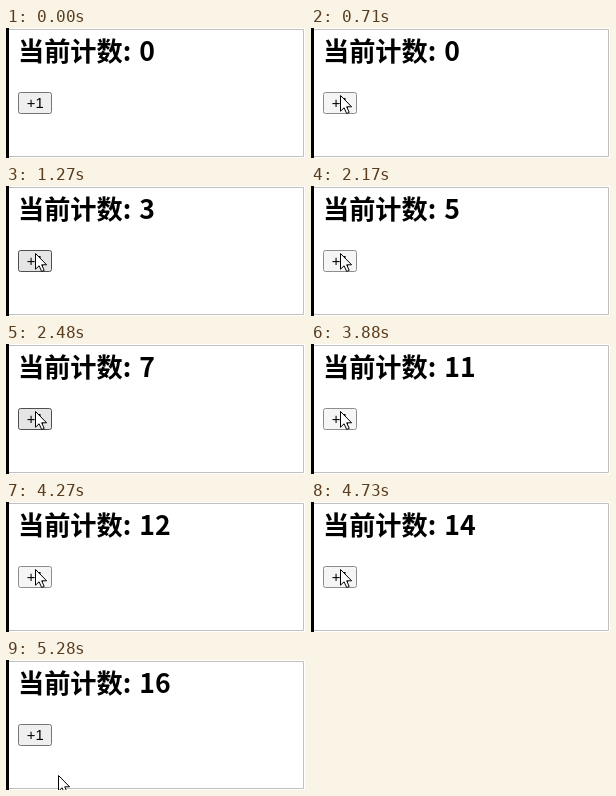
Recreate the animation shown at these times as an HTML page. Size 299 px wide and 130 px high, loop 5920 ms.

```html
<!DOCTYPE html>
<html lang="zh-CN">
<head>
<meta charset="utf-8">
<title>计数器</title>
<style>
  html, body { margin: 0; width: 100%; height: 100%; overflow: hidden; background: #fff; }
  svg { display: block; width: 299px; height: 130px; }
  .heading { font: bold 26.2px "Noto Sans CJK SC", "Noto Sans CJK", "Noto Sans", sans-serif; }
  #count { font-size: 26.6px; }
  .label { font: 14.8px "Liberation Sans", Arial, sans-serif; }
</style>
</head>
<body>
<svg viewBox="0 0 299 130">
  <path d="M3 1.5H297.5V128.5H3" fill="none" stroke="#c0c0c0"/>
  <rect width="3" height="130"/>
  <g class="heading">
    <text x="12" y="32.5">当前计数:</text>
    <text id="count" x="133.2" y="32.5">0</text>
  </g>
  <rect id="button" x="12.5" y="64.5" width="33" height="21" rx="2"/>
  <text class="label" x="29.3" y="80" text-anchor="middle">+1</text>
  <path id="cursor" d="M.5 .5V16.2L4.1 12.8L6.7 18.5L9.2 17.4L6.7 11.8H11.6Z" fill="#fff" stroke="#000"/>
</svg>
<script>
const LOOP = 5920, STEP = 80, ENTER = 70, ENTER_STEPS = 5, PRESS = 115;
const [count, button, cursor] = ['count', 'button', 'cursor'].map(id => document.getElementById(id));

// Two clicks per beat; the cursor leaves on the last beat.
const beats = [780, 1270, 1980, 2480, 3030, 3500, 4280, 4810, 5130];
const leave = beats.at(-1);
const clicks = beats.slice(0, -1).flatMap((beat, i) => [beat, beat + 0.6 * (beats[i + 1] - beat)]);

const looks = {
  normal: ['#efefef', '#767676'],
  hover: ['#e5e5e5', '#4f4f4f'],
  active: ['#f5f5f5', '#8d8d8d']
};

// Rises past the button and settles back, then speeds off to the lower right.
function cursorAt(t) {
  const left = Math.max(0, 1 - Math.floor((t - ENTER) / STEP) / ENTER_STEPS);
  const away = Math.max(0, Math.floor((t - leave) / STEP) + 1) ** 2;
  return {
    x: Math.round(29 + 3 * left + 5.7 * away),
    y: Math.round(67 - 71 * left + 121 * left ** 2 + 12 * away)
  };
}

function draw(t) {
  const { x, y } = cursorAt(t);
  cursor.setAttribute('transform', `translate(${x} ${y})`);

  const over = x >= 12 && x < 46 && y >= 64 && y < 86;
  const pressed = clicks.some(release => t >= release - PRESS && t < release);
  const [fill, stroke] = looks[pressed ? 'active' : over ? 'hover' : 'normal'];
  button.setAttribute('fill', fill);
  button.setAttribute('stroke', stroke);
  count.textContent = clicks.filter(release => t >= release).length;
}

function frame() {
  draw(performance.now() % LOOP);
  requestAnimationFrame(frame);
}
frame();
</script>
</body>
</html>
```
